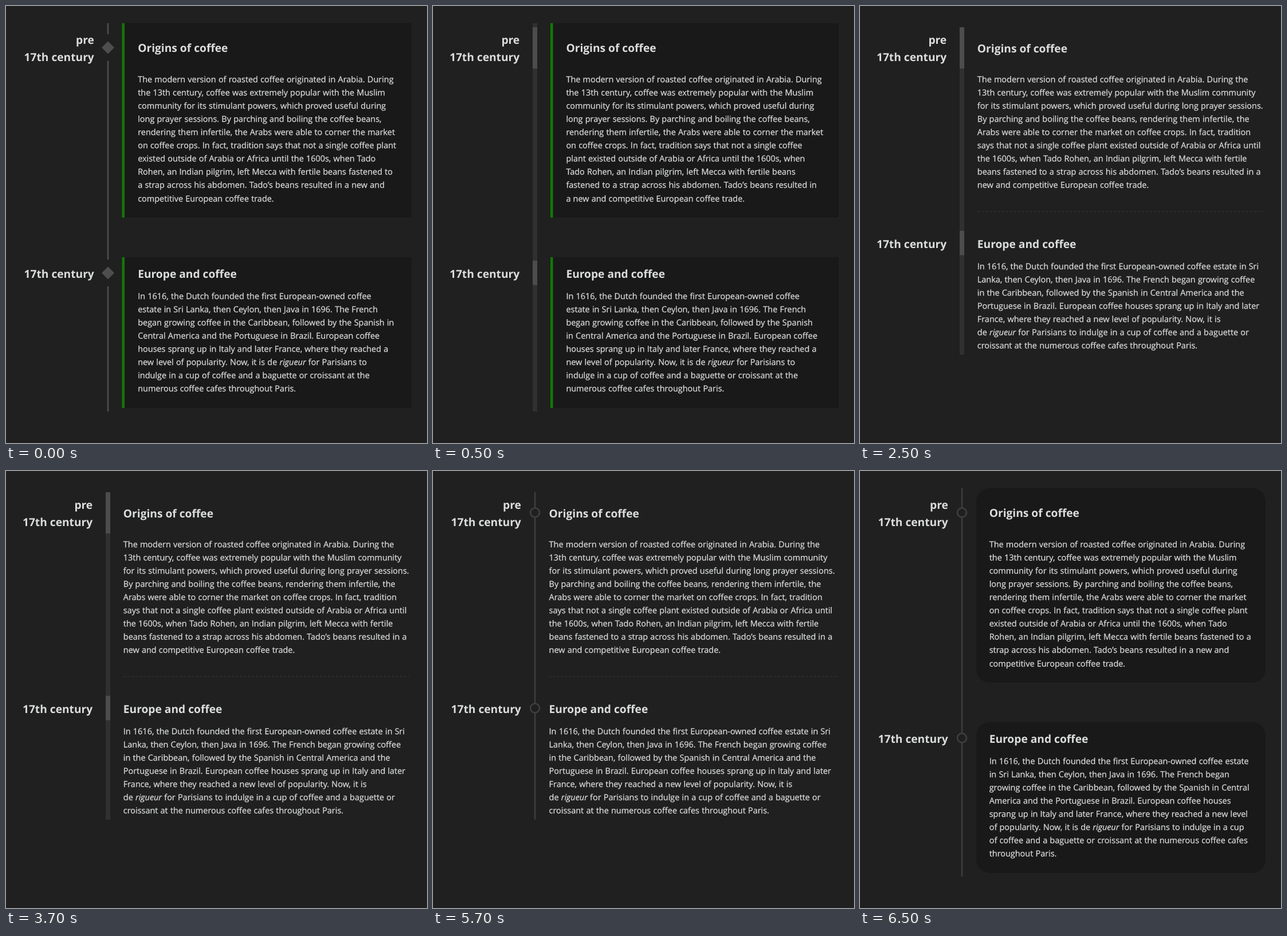
Recreate the animation shown at these times as an HTML page with a canvas. Size 735 by 762 pixels, loop 8 s.

```html
<!DOCTYPE html>
<html lang="en">
<head>
<meta charset="utf-8">
<title>Coffee timeline</title>
<style>
  html, body { margin: 0; width: 100%; height: 100%; overflow: hidden; background: #202020; }
  canvas, svg { position: absolute; left: 0; top: 0; width: 735px; height: 762px; }
  text {
    font: 14.44px "Open Sans", "Noto Sans", sans-serif;
    word-spacing: 0.43px;
    fill: #dcddde;
    stroke: #dcddde;
    stroke-width: 0.25px;
    white-space: pre;
    text-rendering: geometricPrecision;
  }
  .head { font-size: 19.2px; font-weight: 700; word-spacing: 0; stroke: none; }
  .label { text-anchor: end; }
  .em { font-style: italic; }
</style>
</head>
<body>
<canvas id="shapes"></canvas>
<svg id="copy" viewBox="0 0 735 762"></svg>
<script>
const W = 735, H = 762, LOOP = 8000, LINE_H = 23.1;
const BG = '#202020', CARD = '#191919', GREEN = '#127804';
const AXIS = 178, MARK = 72.5;

const origins = 'The modern version of roasted coffee originated in Arabia. During the 13th century, coffee was extremely popular with the Muslim community for its stimulant powers, which proved useful during long prayer sessions. By parching and boiling the coffee beans, rendering them infertile, the Arabs were able to corner the market on coffee crops. In fact, tradition says that not a single coffee plant existed outside of Arabia or Africa until the 1600s, when Tado Rohen, an Indian pilgrim, left Mecca with fertile beans fastened to a strap across his abdomen. Tado’s beans resulted in a new and competitive European coffee trade.'.split(' ');
const europe = 'In 1616, the Dutch founded the first European-owned coffee estate in Sri Lanka, then Ceylon, then Java in 1696. The French began growing coffee in the Caribbean, followed by the Spanish in Central America and the Portuguese in Brazil. European coffee houses sprang up in Italy and later France, where they reached a new level of popularity. Now, it is de rigueur for Parisians to indulge in a cup of coffee and a baguette or croissant at the numerous coffee cafes throughout Paris.'.split(' ');

// Words per line for the open layout without cards.
const openWrap = [[11, 10, 11, 11, 13, 14, 12, 13, 6], [12, 12, 12, 12, 12, 15, 8]];

const scenes = [
  { at: 0, card: 'bar', mark: 'diamond', box: 202.5, text: 230.2, label: 153.8,
    wrap: [[10, 10, 9, 10, 11, 13, 11, 11, 12, 4], [9, 12, 11, 9, 12, 12, 13, 5]] },
  { at: 500, card: 'bar', mark: 'block', box: 205, text: 232.4, label: 151.2,
    wrap: [[10, 10, 9, 10, 11, 12, 11, 10, 11, 7], [9, 12, 10, 10, 12, 12, 13, 5]] },
  { at: 2500, mark: 'block', box: 205, end: 704, text: 204.8, label: 151.2, wrap: openWrap },
  { at: 4500, mark: 'ring', box: 202.5, end: 707, text: 202.6, label: 153.8, wrap: openWrap },
  { at: 6500, card: 'round', mark: 'ring', box: 203, text: 225.7, label: 153.8,
    wrap: [[10, 10, 9, 10, 11, 13, 11, 12, 11, 4], [10, 12, 11, 9, 13, 14, 12, 2]] }
];

const svg = document.getElementById('copy');
const canvas = document.getElementById('shapes');
const ctx = canvas.getContext('2d');
const dpr = window.devicePixelRatio || 1;
canvas.width = W * dpr;
canvas.height = H * dpr;
ctx.scale(dpr, dpr);

function add(parent, tag, attrs = {}, content = '') {
  const el = document.createElementNS('http://www.w3.org/2000/svg', tag);
  for (const key in attrs) el.setAttribute(key, attrs[key]);
  el.textContent = content;
  return parent.appendChild(el);
}

function addLine(parent, x, y, words) {
  const line = add(parent, 'text', { x, y });
  const [before, after] = words.join(' ').split('rigueur');
  add(line, 'tspan', {}, before);
  if (after === undefined) return;
  add(line, 'tspan', { class: 'em' }, 'rigueur');
  add(line, 'tspan', {}, after);
}

function addParagraph(parent, x, y, words, wrap) {
  let from = 0;
  wrap.forEach((count, i) => {
    addLine(parent, x, Math.round(y + i * LINE_H), words.slice(from, from + count));
    from += count;
  });
}

function buildText(s) {
  const g = add(svg, 'g');
  const shift = s.card ? 0 : -52;
  const label = (y, str) => add(g, 'text', { class: 'head label', x: s.label, y }, str);
  const title = (y, str) => add(g, 'text', { class: 'head', x: s.text, y }, str);
  label(66, 'pre');
  label(96, '17th century');
  label(474 + shift, '17th century');
  title(s.card ? 80 : 81, 'Origins of coffee');
  title(474 + shift, 'Europe and coffee');
  addParagraph(g, s.text, 132.6, origins, s.wrap[0]);
  addParagraph(g, s.text, 510.6 + shift, europe, s.wrap[1]);
  return g;
}

function rect(color, x, y, right, bottom) {
  ctx.fillStyle = color;
  ctx.fillRect(x, y, right - x, bottom - y);
}

function drawCard(s, top, bottom) {
  if (s.card === 'round') {
    ctx.fillStyle = CARD;
    ctx.beginPath();
    ctx.roundRect(s.box, top, 708 - s.box, bottom - top, 23);
    ctx.fill();
  } else {
    rect(CARD, s.box, top, 708, bottom);
    rect(GREEN, s.box, top, s.box + 4.5, bottom);
  }
}

function drawDivider(s) {
  ctx.strokeStyle = '#363636';
  ctx.lineWidth = 1;
  ctx.setLineDash([4, 3]);
  ctx.beginPath();
  ctx.moveTo(s.box, 358.5);
  ctx.lineTo(s.end, 358.5);
  ctx.stroke();
  ctx.setLineDash([]);
}

const axes = {
  diamond(top, bottom, second) {
    const color = '#4e4e4e', gap = 23.3, r = 11;
    rect(color, AXIS - 1.3, top, AXIS + 1.3, bottom);
    for (const y of [MARK, second]) {
      rect(BG, AXIS - 3, y - gap, AXIS + 3, y + gap);
      ctx.fillStyle = color;
      ctx.beginPath();
      ctx.moveTo(AXIS, y - r);
      ctx.lineTo(AXIS + r, y);
      ctx.lineTo(AXIS, y + r);
      ctx.lineTo(AXIS - r, y);
      ctx.fill();
    }
  },
  block(top, bottom, second) {
    const bar = (color, y0, y1) => rect(color, 174, y0, 182, y1);
    bar('#303030', top, bottom);
    bar('#4d4d4d', 37, 109);
    bar('#4d4d4d', second - 21.5, second + 21);
  },
  ring(top, bottom, second) {
    rect('#3d3d3d', AXIS - 1.3, top, AXIS + 1.3, bottom);
    ctx.fillStyle = BG;
    ctx.strokeStyle = '#3f3f3f';
    ctx.lineWidth = 2.6;
    for (const y of [MARK, second]) {
      ctx.beginPath();
      ctx.arc(AXIS, y, 8, 0, Math.PI * 2);
      ctx.fill();
      ctx.stroke();
    }
  }
};

function draw(s) {
  rect(BG, 0, 0, W, H);
  if (s.card) {
    drawCard(s, 30, 369);
    drawCard(s, 438, 701);
    axes[s.mark](30, 707, 465.5);
  } else {
    drawDivider(s);
    axes[s.mark](37, 608, 413.5);
  }
}

const groups = scenes.map(buildText);
let shown = -1;

function tick() {
  const t = performance.now() % LOOP;
  const now = scenes.filter(s => s.at <= t).length - 1;
  if (now !== shown) {
    shown = now;
    draw(scenes[now]);
    groups.forEach((g, i) => { g.style.display = i === now ? '' : 'none'; });
  }
  requestAnimationFrame(tick);
}
tick();
</script>
</body>
</html>
```
